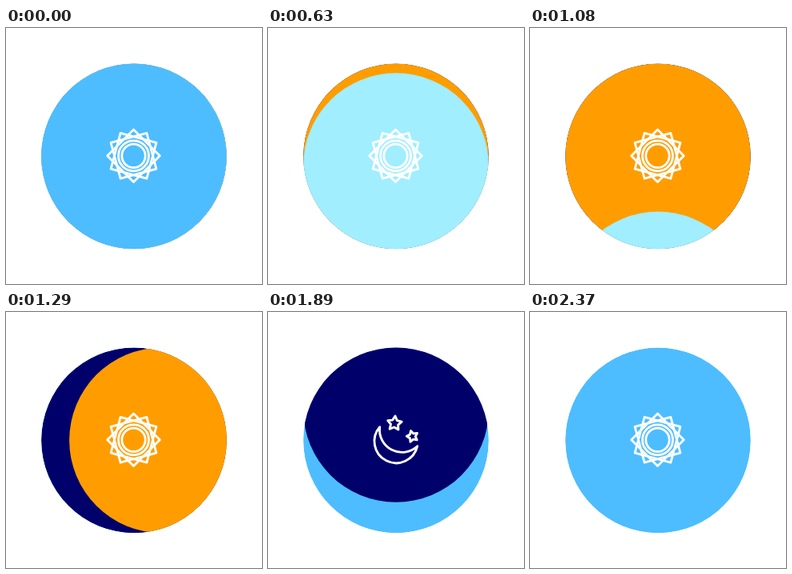
Recreate the animation shown at these times as an HTML page with a canvas. Size 320 by 320 pixels, loop 2.4 s.

```html
<!DOCTYPE html>
<html lang="en">
<head>
<meta charset="utf-8">
<title>Day and night</title>
<style>
html, body { margin: 0; height: 100%; overflow: hidden; background: #fff; }
canvas { display: block; width: 320px; height: 320px; }
</style>
</head>
<body>
<canvas id="stage" width="320" height="320"></canvas>
<script>
const ctx = document.getElementById('stage').getContext('2d');
const LOOP = 2400, PHASE = 600;
const CX = 160, CY = 160.3, R = 115.9;

function circlePath(x, y, r) {
  ctx.beginPath();
  ctx.arc(x, y, r, 0, Math.PI * 2);
}

// Alternates between two radii; equal radii give a regular polygon.
function strokeStar(x, y, points, outer, inner, degrees) {
  ctx.beginPath();
  for (let i = 0; i < points * 2; i++) {
    const angle = degrees * Math.PI / 180 + i * Math.PI / points;
    const r = i % 2 ? inner : outer;
    ctx.lineTo(x + r * Math.cos(angle), y + r * Math.sin(angle));
  }
  ctx.closePath();
  ctx.stroke();
}

function drawSun() {
  ctx.lineWidth = 2.8;
  // Three turned squares interlace into twelve rays.
  for (const turn of [0, 30, 60]) strokeStar(159.5, 159.8, 2, 32.8, 32.8, turn);
  for (const r of [14.7, 19]) {
    circlePath(159.5, 159.8, r);
    ctx.stroke();
  }
}

function drawMoon() {
  ctx.lineWidth = 2.9;
  ctx.stroke(new Path2D('M139.7 143.7A27.2 27.2 0 1 0 186.7 167.7A28 28 0 0 1 139.7 143.7Z'));
  strokeStar(158.2, 139.2, 5, 9.2, 4.8, -85);
  strokeStar(180.5, 155.5, 5, 7.2, 3.8, -106);
}

// Bottom to top; each disc's window slides off by (dx, dy) during its phase.
const discs = [
  { color: '#4dbdff', icon: drawSun, dx: 0, dy: 0, phase: 4 },
  { color: '#00006b', icon: drawMoon, dx: 0, dy: -253, phase: 3 },
  { color: '#ff9d00', icon: drawSun, dx: 231, dy: 0, phase: 2 },
  { color: '#a0eeff', icon: drawSun, dx: 0, dy: 231, phase: 1 },
  { color: '#4dbdff', icon: drawSun, dx: -231, dy: 0, phase: 0 }
];

function drawDisc({ color, icon, dx, dy, phase }, time) {
  const progress = Math.max(0, time / PHASE - phase);
  if (progress >= 1) return;
  ctx.save();
  circlePath(CX + dx * progress, CY + dy * progress, R);
  ctx.clip();
  ctx.fillStyle = color;
  circlePath(CX, CY, R);
  ctx.fill();
  icon();
  ctx.restore();
}

function render(now) {
  const time = now % LOOP;
  ctx.clearRect(0, 0, 320, 320);
  ctx.strokeStyle = '#fff';
  ctx.lineJoin = 'round';
  for (const disc of discs) drawDisc(disc, time);
  requestAnimationFrame(render);
}

requestAnimationFrame(render);
</script>
</body>
</html>
```
